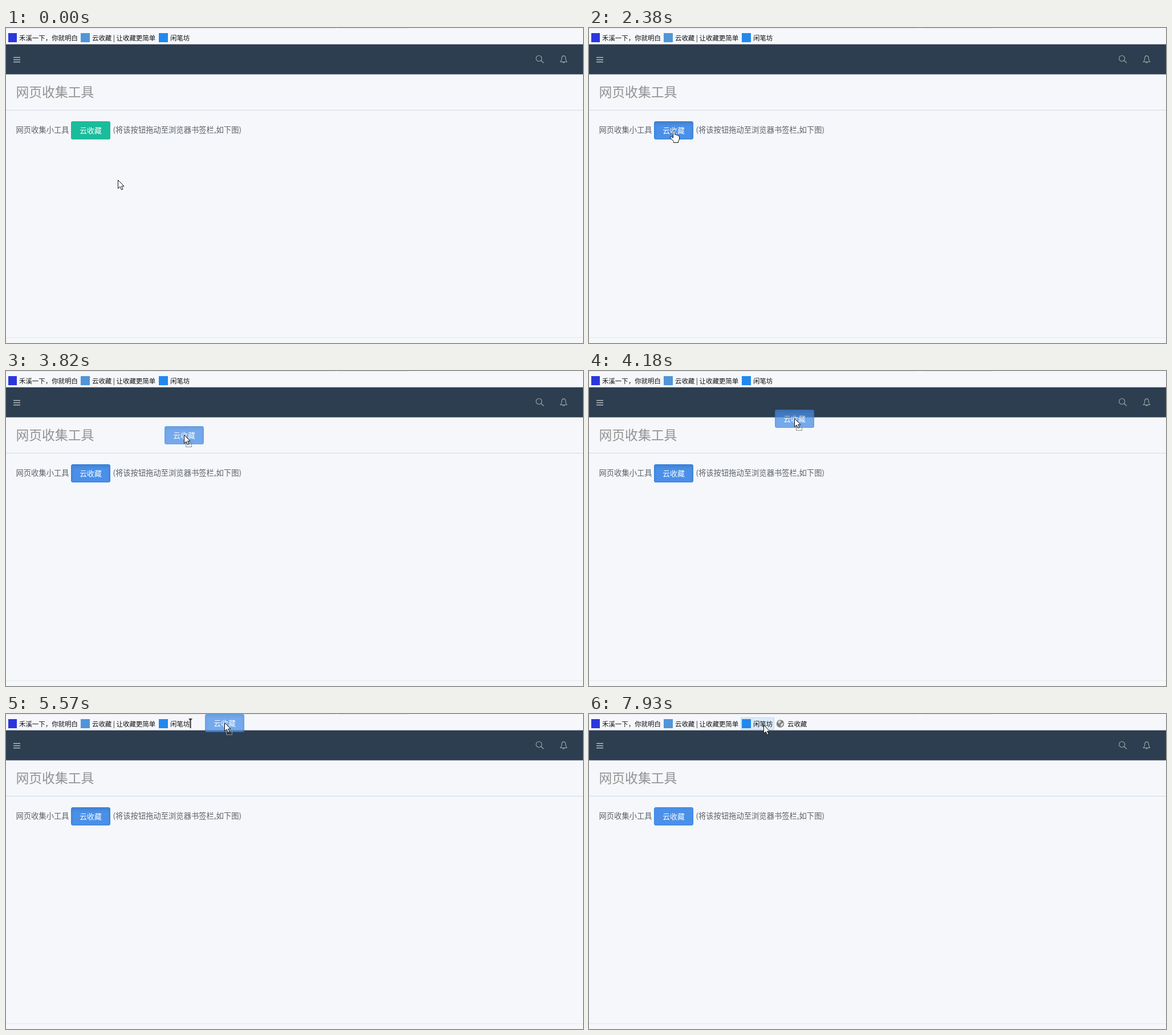
An HTML page that plays this animation: 1012 by 554 pixels, repeating every 8000 ms.

```html
<!DOCTYPE html>
<html lang="zh-CN">
<head>
<meta charset="utf-8">
<title>网页收集工具</title>
<style>
html, body { margin: 0; width: 100%; height: 100%; overflow: hidden; background: #f5f7fb; }
svg { display: block; width: 1012px; height: 554px; font: 13.3px "Noto Sans CJK SC", "Noto Sans CJK", sans-serif; }
.mark { font-size: 11.45px; fill: #111; }
.icon { fill: none; stroke: #a3a9ab; stroke-width: 1.1; }
.hot { fill: #dbeaf8; stroke: #bedcf3; }
.pointer { fill: #fff; stroke: #111; stroke-linejoin: round; }
.button {
  box-sizing: border-box; width: 69px; height: 32px; border: 1px solid #3484e0; border-radius: 3px;
  background: #4a90e8; color: #fff; font-size: 12.8px; line-height: 30px; text-align: center;
}
.pressed { box-shadow: inset 0 3px 5px rgba(0, 0, 0, .125); }
.green { background: #1bbc9b; border-color: transparent; background-clip: border-box; }
.hover { background-color: #11b493; }
</style>
</head>
<body>
<svg viewBox="0 0 1012 554">
  <defs>
    <path id="arrow" class="pointer" d="M.5 .5V15.2L4 12L6.6 17.5L9 16.4L6.5 11.2H11Z"/>
  </defs>

  <!-- bookmark bar -->
  <path d="M0 .5H578M583 .5H707" stroke="#e3e5e9"/>
  <path d="M0 28.5H1012" stroke="#b4b8bc"/>
  <rect id="hotNew" class="hot" x="325.5" y="6.5" width="59" height="21"/>
  <rect id="hotOld" class="hot" x="266.5" y="6.5" width="58" height="21"/>
  <rect x="4" y="9" width="15" height="16" fill="#2b37dc"/>
  <rect x="131" y="9" width="16" height="16" fill="#5095d8"/>
  <rect x="268" y="9" width="16" height="16" fill="#2288ee"/>
  <g class="mark">
    <text x="23" y="21.5">禾溪一下，你就明白</text>
    <text x="151" y="21.5">云收藏 | 让收藏更简单</text>
    <text x="288" y="21.5">闲笔坊</text>
  </g>
  <g id="added">
    <circle cx="335.5" cy="17" r="6.7" fill="#7d7d7d"/>
    <path d="M331 14l3-2.5 3 .5-1 3-3 2zM336 18l4-3 1 2-2 4-3 1z" fill="#d9dcde"/>
    <text class="mark" x="348" y="21.5">云收藏</text>
  </g>

  <!-- navigation -->
  <rect y="29" width="1012" height="52.5" fill="#2d3e50"/>
  <path d="M13 51.7H25M13 55.7H25M13 59.7H25" stroke="#b4babd" stroke-width="1.6"/>
  <g class="icon">
    <circle cx="934.7" cy="53.5" r="5"/>
    <path d="M938.3 57L943 61.5"/>
    <path d="M972.5 59.5C975 57 974.5 55 974.7 53C975 47.5 981 47.5 981.5 53C981.7 55 981.5 57 983.7 59.5ZM976.5 60Q978 63 979.7 60"/>
  </g>

  <!-- page -->
  <text x="17.5" y="120.5" font-size="22.8" fill="#929292">网页收集工具</text>
  <path d="M0 144.5H1012" stroke="#d0dbe2"/>
  <path d="M0 544.5H1012" stroke="#e4eaec"/>
  <g fill="#5c6066">
    <text x="17.5" y="184">网页收集小工具</text>
    <text x="187.5" y="184">(将该按钮拖动至浏览器书签栏,如下图)</text>
  </g>
  <foreignObject x="114" y="164" width="69" height="32">
    <div id="button">云收藏</div>
  </foreignObject>

  <!-- drag and pointers -->
  <path id="insert" d="M320 8h7l-2.5 3v14h-2v-14z" fill="#333"/>
  <foreignObject id="ghost" width="69" height="32" opacity=".75">
    <div class="button pressed">云收藏</div>
  </foreignObject>
  <g id="pointer">
    <g id="drag" fill="none">
      <rect x="3.5" y="13.5" width="10" height="8" stroke="#222"/>
      <rect x="3.5" y="13.5" width="10" height="8" stroke="#fff" stroke-dasharray="1 1"/>
    </g>
    <use id="plain" href="#arrow"/>
    <path id="hand" class="pointer" transform="translate(-7 0)" d="M5.5 13V2.5Q5.5 .5 7 .5T8.7 2.5V7.5Q11 6.5 11.7 8.5Q14 7.7 14.5 9.5Q16.5 9 16.5 11.5V15Q16.5 17 14.5 19V21.5H6.5V19.5L1 13.5Q0 11.5 1.5 11T4 12.5Z"/>
  </g>
</svg>
<script>
const LOOP = 8000, STEP = 135;
// Pointer strokes as [time, x, y]; the pointer rests between strokes.
const strokes = [
  [[0, 196, 267], [460, 150, 179], [580, 159, 193]],
  [[1420, 154, 189], [1690, 149, 180]],
  [[3120, 153, 176], [3390, 230, 154], [3700, 296, 122], [4180, 360, 83],
   [4450, 375, 56], [4870, 380, 37], [5570, 383, 15]],
  [[6680, 380, 37], [6830, 375, 60], [7220, 322, 53], [7660, 307, 23], [7930, 306, 19]]
];
const el = id => document.getElementById(id);
const show = (id, on) => el(id).style.display = on ? "" : "none";
const move = (id, x, y) => el(id).setAttribute("transform", `translate(${x} ${y})`);

// The screen refreshes about every STEP ms, so travel advances in even jumps.
function pointerAt(t) {
  const stroke = strokes.findLast(s => s[0][0] <= t);
  const i = stroke.findLastIndex(p => p[0] <= t);
  const [t0, x0, y0] = stroke[i], [t1, x1, y1] = stroke[i + 1] || [LOOP, x0, y0];
  const jumps = Math.round((t1 - t0) / STEP) || 1;
  const u = Math.floor((t - t0) / (t1 - t0) * jumps) / jumps;
  return [Math.round(x0 + (x1 - x0) * u), Math.round(y0 + (y1 - y0) * u)];
}

function draw(t) {
  const [x, y] = pointerAt(t);
  const within = (a, b) => t >= a && t < b;
  const hand = within(460, 3120), dragging = within(3120, 6120);

  move("pointer", x, y);
  move("ghost", x - 34, y - 15);
  show("hand", hand);
  show("plain", !hand);
  show("drag", dragging);
  show("ghost", dragging);

  show("insert", within(5300, 6120));
  show("added", t >= 6240);
  show("hotNew", within(6240, 6830));
  show("hotOld", t >= 7810);

  el("button").className = "button " +
    (t < 460 ? "green" : t < 2380 ? "green hover" : t < 6120 ? "pressed" : "");
}

const start = performance.now();
function tick() {
  draw((performance.now() - start) % LOOP);
  requestAnimationFrame(tick);
}
tick();
</script>
</body>
</html>
```
